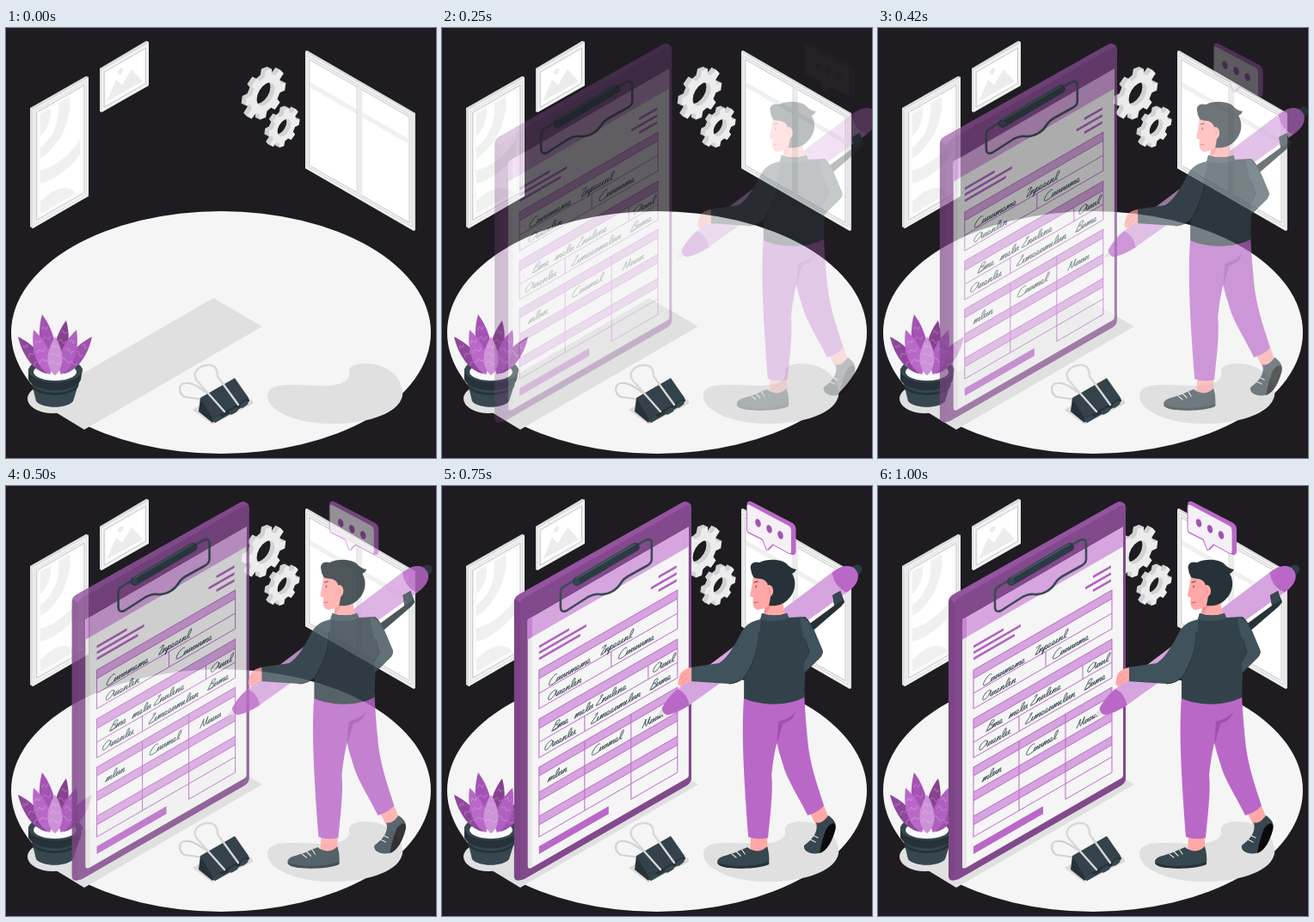
These frames come from a looping animation (500 by 500 pixels, 1.04 s). An HTML page:

```html
<!DOCTYPE html>
<html lang="en">
<head>
<meta charset="utf-8">
<title>Filling in a form</title>
<style>
html, body { margin: 0; width: 100%; height: 100%; overflow: hidden; background: #1e1c21; }
svg { display: block; width: 100vw; height: 100vh; }
</style>
</head>
<body>
<svg viewBox="0 0 500 500" fill="none" stroke-linecap="round" stroke-linejoin="round">
  <!-- floor and shadows -->
  <ellipse cx="250" cy="354" rx="244" ry="141" fill="#f5f5f5"/>
  <g fill="#e0e0e0">
    <path d="M241 314L298 347L91 467L35 433Z"/>
    <ellipse cx="54" cy="431" rx="29" ry="17"/>
    <path d="M304 428C304 412 330 415 362 416C385 417 401 412 399 401C397 390 415 389 428 391C450 395 463 412 461 428C455 452 410 461 375 460C340 460 304 446 304 428Z"/>
    <path d="M217 444L266 415L287 434V437L240 461Z" fill="#d9d9d9"/>
  </g>

  <!-- large picture -->
  <path d="M28 93L93 56L96 57V195L31 233L28 231Z" fill="#dcdcdc"/>
  <g transform="matrix(1 -.577 0 1 31 95)">
    <path d="M0 0H65V138H0Z" fill="#f2f2f2"/>
    <path d="M5 6H60V131H5Z" fill="#fafafa" stroke="#bbb" stroke-width=".7"/>
    <path d="M2.500 3H62.500V135H2.500Z" stroke="#d8d8d8" stroke-width=".6"/>
    <path d="M9 10H55V126H9Z" fill="#fff"/>
    <g fill="#f0f0f0">
      <path d="M9 10H21C22 24 17 33 9 36ZM30 10H43C46 38 32 60 9 62V49C25 46 32 30 30 10Z"/>
      <path d="M9 76C30 82 46 76 55 66V84C42 94 22 96 9 91ZM9 112C24 104 43 111 50 126H9Z"/>
    </g>
  </g>

  <!-- small picture -->
  <path d="M109 47L163 15L166 16V67L111 98L109 97Z" fill="#dcdcdc"/>
  <g transform="matrix(1 -.577 0 1 111 49)">
    <path d="M0 0H55V49H0Z" fill="#f2f2f2"/>
    <path d="M3.500 4H51.500V45H3.500Z" fill="#fafafa" stroke="#bbb" stroke-width=".7"/>
    <path d="M6 7H49V42H6Z" fill="#fff"/>
    <path d="M6 40L17 21L24 31L35 19L48 41Z" fill="#ececec"/>
    <circle cx="22" cy="14" r="3.200" fill="#ececec"/>
  </g>

  <!-- window -->
  <path d="M348 27L350 26L476 99V235L474 236L348 163Z" fill="#dcdcdc"/>
  <g transform="matrix(1 .573 0 1 348 27)">
    <path d="M0 1H126V136H0Z" fill="#f2f2f2"/>
    <path d="M2 4H124V133H2Z" stroke="#c8c8c8" stroke-width=".6"/>
    <path d="M5 7H121V130H5Z" fill="#fff" stroke="#bbb" stroke-width=".7"/>
    <path d="M5 33H121V39H5Z" fill="#f0f0f0"/>
    <path d="M60 7H66V130H60Z" fill="#ececec"/>
    <path d="M60 7V130" stroke="#d8d8d8" stroke-width=".8"/>
  </g>

  <g id="gears"></g>

  <!-- plant -->
  <path d="M28 405L35 434C42 443 71 443 78 434L87 405Z" fill="#37474f"/>
  <path d="M26 396V409C33 425 80 426 87 409L89 396Z" fill="#263238"/>
  <path d="M29 413C37 428 78 428 85 412L84 417C76 430 38 430 31 418Z" fill="#263238"/>
  <ellipse cx="57.500" cy="398" rx="31.500" ry="14" fill="#37474f"/>
  <ellipse cx="57" cy="400" rx="25" ry="10" fill="#fafafa"/>
  <g id="leaves"></g>

  <!-- binder clip -->
  <path d="M238 433L208 429C200 425 200 413 209 413C218 412 228 420 240 429" stroke="#d2d2d2" stroke-width="2.200"/>
  <path d="M226 430L224 446L240 459L245 447Z" fill="#263238"/>
  <path d="M226 430L266 407L282 430L280 438L243 459Z" fill="#34434b"/>
  <path d="M241 456L281 433" stroke="#263238" stroke-width="4"/>
  <path d="M243 456L248 453M262 447L267 444M275 439L279 436" stroke="#37474f" stroke-width="5"/>
  <path d="M254 446L222 410C215 400 225 392 236 392C244 392 246 398 246 405L270 438" stroke="#d8d8d8" stroke-width="2.400"/>

  <!-- clipboard -->
  <g id="board">
    <path d="M82 135Q82 129 88 126L278 19Q283 17 287 21Q289 24 288 30V339Q288 345 283 348L93 457Q87 460 84 458Q82 457 82 453Z" fill="#7c4586"/>
    <path d="M83 131Q84 128 88 126L278 19Q283 17 287 21L288 30L94 134L89 136Z" fill="#9553a0"/>
    <path d="M89 139Q89 133 94 130L282 23Q288 20 288 28V339Q288 345 283 348L94 457Q89 459 89 453Z" fill="#82498c"/>
    <g transform="matrix(1 -.577 0 1 0 0)">
      <path d="M98 212H285V501Q285 503 283 503H103Q98 503 98 498Z" fill="#f5f5f5"/>
      <path d="M98 212H103V502Q98 502 98 498Z" fill="#e6e6e6"/>
      <path d="M98 212H285V235H98Z" fill="#d6a4de"/>
      <path d="M98 212H103V235H98Z" fill="#c583d1"/>
      <path d="M111 251H146M111 258H166M111 265H159M250 250H271M241 258H271M250 266H271" stroke="#b263c0" stroke-width="3" stroke-linecap="butt"/>
      <path d="M111 483H192V492H111Z" fill="#ba68c8"/>
      <g id="table"></g>
      <g id="writing" stroke="#37474f" stroke-width=".75"></g>
    </g>
    <path d="M150 111L140 117Q136 119 136 124V140Q136 148 143 145L168 129C174 126 177 125 182 126C192 127 202 120 206 113C209 108 212 106 218 103L236 93Q242 90 242 85V67Q242 60 235 63L226 68" stroke="#3b4a55" stroke-width="2.600"/>
    <path d="M155 111L223 71" stroke="#2c3b43" stroke-width="10"/>
    <path d="M155 107L222 68" stroke="#455a64" stroke-width="2"/>
    <circle cx="155" cy="111" r="3.500" fill="#37474f"/>
  </g>

  <!-- speech bubble -->
  <g id="bubble">
    <path d="M360 22Q360 17 365 18L413 43Q417 46 417 50V77Q416 81 412 80L391 69L385 75L378 63L362 55Q360 54 360 51Z" fill="#ba68c8"/>
    <path d="M360 24Q360 20 364 22L409 46Q412 48 412 52V76Q412 80 408 78L390 68L383 75L378 62L362 54Q360 53 360 50Z" fill="#f5f0f6" stroke="#ba68c8"/>
    <g fill="#a552b5">
      <ellipse cx="373" cy="43" rx="3" ry="5" transform="rotate(-18 373 43)"/>
      <ellipse cx="386" cy="50" rx="3" ry="5" transform="rotate(-18 386 50)"/>
      <ellipse cx="399" cy="57" rx="3" ry="5" transform="rotate(-18 399 57)"/>
    </g>
  </g>

  <!-- man with pen -->
  <g id="man">
    <g transform="translate(251 268) rotate(-36.200)">
      <path d="M0 0L13 -4V5Z" fill="#e0e0e0"/>
      <path d="M280 -6H288Q295 -5 295 0T288 6H280Z" fill="#2c3b43"/>
      <path d="M36 -11L265 -14.500V14.500L36 12Z" fill="#d6a4de"/>
      <path d="M11 -4C20 -8 30 -11 39 -11Q45 0 39 12C28 12 18 9 11 6Q8 1 11 -4Z" fill="#ba68c8"/>
      <path d="M264 -14.500C279 -15 288 -9 288 0S279 15 264 14.500Q256 0 264 -14.500Z" fill="#ba68c8"/>
    </g>
    <path d="M424 164L458 139L456 127L465 122L470 135L466 140L430 171Z" fill="#263238"/>
    <path d="M458 139L456 127L465 122L468 133Z" fill="#37474f"/>

    <!-- legs -->
    <path d="M430 381L446 372L452 387L437 395ZM361 407H380V424L360 426Z" fill="#ffa8a7"/>
    <path d="M385 250L423 241C424 265 426 285 428 305C432 332 440 352 446 372Q438 380 427 383C417 362 403 342 398 323C395 313 392 305 391 296Z" fill="#ba68c8"/>
    <path d="M353 245C350 280 352 330 358 408Q369 412 381 409C384 380 387 352 385 337C387 315 391 298 396 277L413 262L423 243Z" fill="#ba68c8"/>
    <path d="M393 274C400 271 408 270 413 262C410 274 402 274 398 277L391 302Z" fill="#a050ad"/>

    <!-- shoes -->
    <path d="M322 437C322 430 335 430 345 425L357 420C364 426 374 426 380 419Q383 429 382 439C374 444 345 446 330 443Q322 441 322 437Z" fill="#37474f"/>
    <path d="M322 438C340 444 362 443 382 437V440C372 445 345 446 330 443Q322 441 322 438Z" fill="#263238"/>
    <path d="M339 428L344 432M344 425L349 430M350 422L354 428" stroke="#e0e0e0" stroke-width="1.200"/>
    <path d="M437 391C441 394 448 388 451 383C458 388 461 392 459 400C455 412 450 424 440 427C430 429 421 424 423 418C430 412 440 405 437 391Z" fill="#37474f"/>
    <path d="M449 398C456 389 461 391 459 400C456 412 450 424 441 427Q443 413 449 398Z" fill="#0b0b0d"/>
    <path d="M433 406L439 409M430 411L436 414" stroke="#e0e0e0" stroke-width="1.200"/>

    <!-- head -->
    <path d="M364 102C363 115 361 121 360 128L364 130C362 137 364 144 370 144L377 142L376 152C383 158 396 156 400 150L398 132L384 106Z" fill="#ffa8a7"/>
    <path d="M377 142Q381 140 384 136Q384 145 376 149Z" fill="#f28f8f"/>
    <path d="M361 97C359 90 365 87 371 89C380 84 396 85 402 90Q407 96 414 97Q412 101 409 102C415 112 412 124 405 131C399 138 391 140 382 139L384 128L380 113C376 106 370 109 364 106Q361 101 361 97Z" fill="#263238"/>
    <ellipse cx="382" cy="122" rx="5" ry="7" fill="#ffa8a7"/>
    <path d="M381 119Q385 121 382 126" stroke="#f28f8f"/>
    <path d="M365 112L369 111M367 116V118" stroke="#263238" stroke-width=".9"/>
    <path d="M365 136L369 135" stroke="#a8575b" stroke-width=".9"/>

    <!-- jacket -->
    <path d="M372 155L374 148Q388 153 403 148L405 153L424 152C432 158 438 176 444 190Q446 195 441 200L424 217L423 246C400 257 371 255 353 247C353 215 353 190 358 165Z" fill="#33424a"/>
    <path d="M418 152C430 153 437 176 444 190Q446 195 441 200L423 217V203L429 193Q420 175 418 152Z" fill="#40525b"/>
    <path d="M423 204L429 193L424 178" stroke="#263238" stroke-width="1"/>
    <path d="M372 155L374 148Q388 153 403 148L405 154Q388 160 372 155Z" fill="#40525b"/>
    <path d="M373 155C360 157 354 163 350 170C340 190 333 200 324 206L290 211V227L336 230Q347 229 354 222C362 209 372 190 371 171Z" fill="#40525b"/>
    <path d="M370 170C371 190 362 209 354 222Q347 229 336 230" stroke="#263238" stroke-width="1"/>
    <path d="M292 211C285 212 279 216 278 221L276 230Q280 236 284 230L292 227Z" fill="#ffa8a7"/>
    <path d="M279 224L285 218M281 229L287 223" stroke="#f28f8f" stroke-width="1"/>
  </g>
</svg>
<script>
const $ = id => document.getElementById(id);

// Extruded gear lying in the isometric wall plane
function gear(cx, cy, r, hole, turn) {
  const teeth = 8, pts = [];
  for (let i = 0; i < teeth; i++)
    for (const [at, k] of [[-.3, .76], [-.2, 1], [.2, 1], [.3, .76]]) {
      const a = (i + at + turn) / teeth * 2 * Math.PI;
      pts.push(`${r * k * Math.cos(a)} ${r * k * Math.sin(a)}`);
    }
  const d = `M${pts.join('L')}ZM${hole} 0A${hole} ${hole} 0 1 0 ${-hole} 0A${hole} ${hole} 0 1 0 ${hole} 0Z`;
  let out = '';
  for (let z = 5; z >= 0; z--)
    out += `<path d="${d}" fill-rule="evenodd" fill="${z ? '#d2d2d2' : '#ececec'}" transform="matrix(.866 -.5 0 1 ${cx - z} ${cy - z / 2})"/>`;
  return out;
}
$('gears').innerHTML = gear(302, 77, 27, 12, .2) + gear(323.5, 116, 21, 9, .22);

// Leaf from its base to its tip, with pale wavy veins
function leaf([x, y, tipX, tipY, w, color]) {
  const len = Math.hypot(tipX - x, tipY - y);
  const turn = Math.atan2(tipX - x, y - tipY) * 180 / Math.PI;
  const veins = [.3, .52, .72].map(k => {
    const h = w * (1.1 - k) * .95;
    return `M${-h} ${-len * k}q${h / 2} -5 ${h} -1t${h} -1`;
  }).join('');
  return `<g transform="translate(${x} ${y}) rotate(${turn})">
    <path d="M0 0C${-w * 1.5} ${-len * .25} ${-w} ${-len * .7} 0 ${-len}C${w} ${-len * .7} ${w * 1.5} ${-len * .25} 0 0Z" fill="${color}"/>
    <path d="${veins}" stroke="#fff" stroke-width=".8" opacity=".3"/></g>`;
}
$('leaves').innerHTML = [
  [53, 393, 42, 333, 9, '#a552b5'],
  [60, 393, 70, 340, 8, '#86428f'],
  [48, 402, 14, 359, 8, '#8f479c'],
  [67, 402, 100, 359, 8, '#a050ae'],
  [51, 403, 32, 351, 9, '#ba68c8'],
  [64, 403, 82, 351, 9, '#b060c0'],
  [57, 404, 57, 359, 9, '#cd92d7']
].map(leaf).join('');

// Form tables
const bands = [[278, 10], [335, 11], [391, 10], [420, 10], [448, 10]];
$('table').innerHTML =
  bands.map(([y, h]) => `<path d="M111 ${y}h161v${h}h-161z" fill="#d6a4de"/>`).join('') +
  `<path d="M111 278H272V323H111ZM111 288H272M111 305H272M195 305V323
    M111 335H272V380H111ZM111 346H272M111 362H272M238 346V362M164 362V380
    M111 391H272V490H218V391M111 391V472H272M164 391V472
    M111 401H272M111 420H272M111 430H272M111 448H272M111 458H272" stroke="#ba68c8" stroke-width="1"/>`;

// Joined-up pen strokes, each starting and ending on the baseline
const strokes = {
  e: 'c4-1 4-5 2-5s-3 5 1 5h2',
  u: 'l1.5-5q-1.5 5 .5 5t2-5q-1 5 1.5 5',
  n: 'q1-1 1.5-5l-.7 5q2-5 3-5t0 5h2',
  m: 'q1-1 1.5-5l-.7 5q2-5 3-5t-.5 5q2-5 3-5t0 5h1.5',
  l: 'c4-3 5-11 3-11s-3 11 0 11h1.5',
  i: 'l1.5-5q-1.5 5 .5 5h1.5',
  p: 'l1.5-5l-2 10l2-10c4 0 3 5 0 5h3',
  t: 'l2-9l-1 8q0 1 1.5 1',
  C: 'm8-10c-3-4-9 3-8 8c1 4 6 2 9 2',
  Q: 'm8-8c-1-5-9-1-8 5c1 5 8 3 9-5q0 8 2 8',
  B: 'l3-11c6-1 5 4 0 5c6 0 4 6-2 6h6',
  L: 'm3-10c3-3 4-1 1 3s-5 7-3 7h6',
  N: 'l2-10q1 10 3 10l2-10q-1 9 2 10',
  I: 'm1-9q3-2 5-1l-4 10h4'
};
$('writing').innerHTML = [
  [122, 303, 'Cuuumeme'], [181, 302, 'Inpeeinl'],
  [121, 320, 'Quenlin'], [203, 319, 'Cuuuume'],
  [126, 358, 'Bme'], [152, 358, 'melu'], [177, 358, 'Lnuline'], [243, 358, 'Quul'],
  [117, 376, 'Quenlii'], [171, 376, 'Limeeumilun'], [240, 376, 'Bume'],
  [121, 414, 'mlun'], [172, 413, 'Cuumel'], [231, 415, 'Nuuu']
].map(([x, y, word]) =>
  `<path d="M0 0${[...word].map(c => strokes[c]).join('')}" transform="translate(${x} ${y}) skewX(-18) scale(.95 .8)"/>`
).join('');

// Cubic Bezier easing (.36, -.01, .5, 1.38) with overshoot
function ease(x) {
  const curve = (s, a, b) => 3 * (1 - s) ** 2 * s * a + 3 * (1 - s) * s * s * b + s ** 3;
  let lo = 0, hi = 1;
  for (let i = 0; i < 24; i++) {
    const mid = (lo + hi) / 2;
    if (curve(mid, .36, .5) < x) lo = mid; else hi = mid;
  }
  return curve(lo, -.01, 1.38);
}

function slide(id, dx, opacity) {
  $(id).setAttribute('transform', `translate(${dx} 0)`);
  $(id).setAttribute('opacity', opacity);
}

const LOOP = 1040, FPS = 24;
const start = performance.now();
function draw() {
  const t = (performance.now() - start) % LOOP;
  // Pictures start on the nearest 10 ms, hence the 5 ms lead
  const step = Math.floor((t + 5) * FPS / 1000);
  const p = ease(Math.min(1, (step + 1) / FPS));
  const shown = step ? Math.min(1, p) : 0;
  slide('board', -30 * (1 - p), shown);
  slide('man', 30 * (1 - p), shown);
  slide('bubble', 90 * (1 - p), shown ** 3);
  requestAnimationFrame(draw);
}
draw();
</script>
</body>
</html>
```
